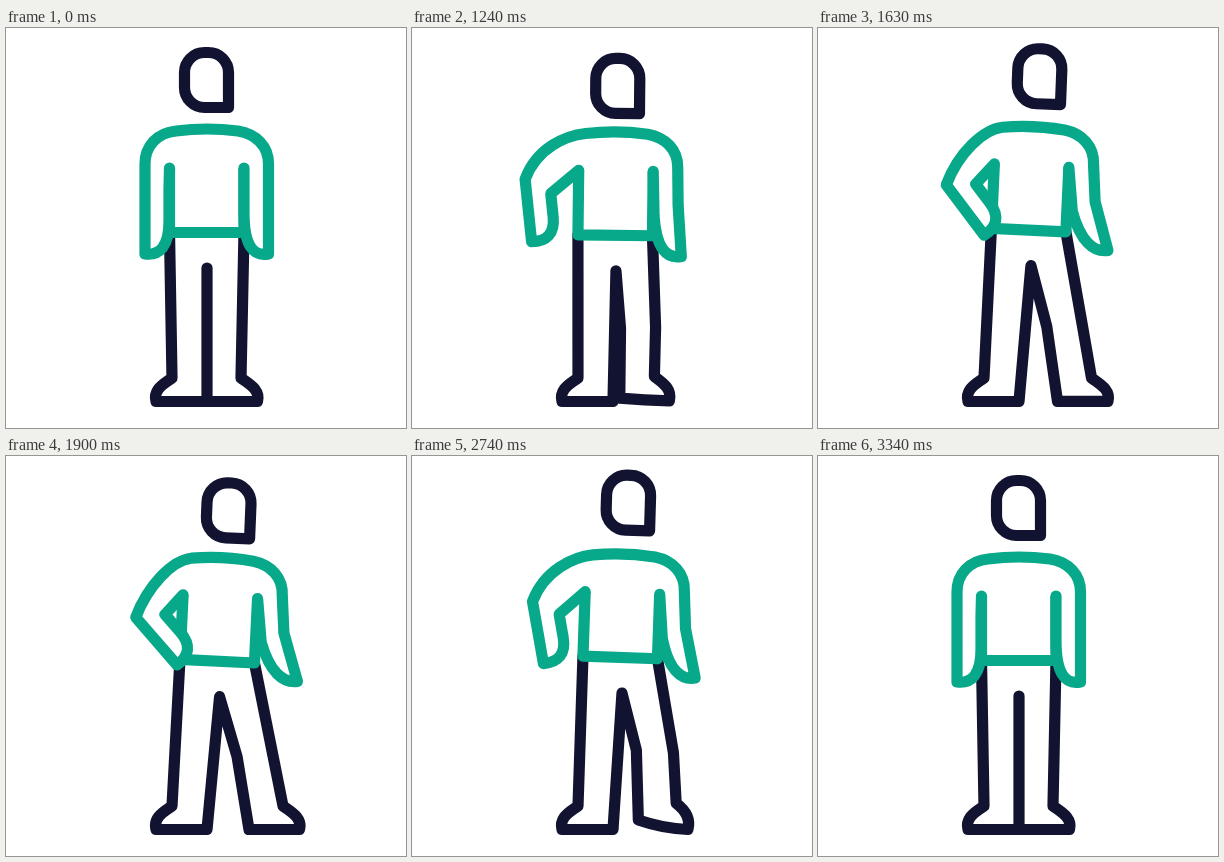
Write an HTML page that moves like this. It is 400 px wide and 400 px high and loops after 3.37 s.

```html
<!DOCTYPE html>
<html>
<head>
<meta charset="utf-8">
<style>
  html, body { margin: 0; height: 100%; overflow: hidden; background: #fff; }
  svg { display: block; width: 100vw; height: 100vh; }
  path { fill: none; stroke-width: 11.2; stroke-linecap: round; stroke-linejoin: round; }
  .dark { stroke: #121331; }
  .green { stroke: #08a88a; }
  #arms { fill: #fff; }
</style>
</head>
<body>
<svg viewBox="0 0 400 400">
  <path id="legs" class="dark"/>
  <path id="head" class="dark" d="M22 27.5H-2A20 20 0 0 1 -22 7.5V-7.5A20 20 0 0 1 -2 -27.5H2A20 20 0 0 1 22 -7.5Z"/>
  <path id="waist" class="green"/>
  <path id="arms" class="green"/>
</svg>
<script>
const LOOP = 3370;

// Motion channels as [time, value] keys
const motion = {
  lean:    [[1000, 0], [1420, 5.5], [1700, 10.5], [2500, 10.2], [2740, 7.5], [3340, 0]],
  drop:    [[1000, 0], [1210, 3], [1420, -0.8], [1530, -3], [1900, 0.7], [2320, 0.7],
            [2500, 3], [2740, -3], [3060, 1.5], [3340, 0]],
  bend:    [[1000, 0], [1310, 1.15], [1420, 1], [2740, 1], [3340, 0]],
  forearm: [[1000, 0], [1420, 15], [1600, 36], [1900, 41], [2320, 41], [2500, 28], [2740, 10], [3340, 0]],
  step:    [[1000, 0], [1420, 14.5], [1700, 42], [2320, 42], [2500, 43], [2740, 24.5], [3340, 0]],
  lift:    [[1200, 0], [1420, 7.5], [1640, 0]],
  pitch:   [[1150, 0], [1420, 0.2], [1640, 0], [2500, 0], [2740, 0.19], [2950, 0]]
};

// Monotone cubic interpolation: flat at holds and turning points
function sample(keys, t) {
  const last = keys.length - 1;
  if (t <= keys[0][0]) return keys[0][1];
  if (t >= keys[last][0]) return keys[last][1];
  const i = keys.findIndex(k => k[0] > t) - 1;
  const slope = n => (keys[n + 1][1] - keys[n][1]) / (keys[n + 1][0] - keys[n][0]);
  const tangent = n => {
    if (n === 0 || n === last) return 0;
    const a = slope(n - 1), b = slope(n);
    return a * b <= 0 ? 0 : 2 * a * b / (a + b);
  };
  const [t0, v0] = keys[i], [t1, v1] = keys[i + 1];
  const h = t1 - t0, u = (t - t0) / h, w = 1 - u;
  return v0 * (1 + 2 * u) * w * w + v1 * (3 - 2 * u) * u * u
    + h * u * w * (tangent(i) * w - tangent(i + 1) * u);
}

const add = (p, x, y) => [p[0] + x, p[1] + y];
const mix = (a, b, k) => [a[0] + (b[0] - a[0]) * k, a[1] + (b[1] - a[1]) * k];
const turn = (x, y, a) => [x * Math.cos(a) - y * Math.sin(a), x * Math.sin(a) + y * Math.cos(a)];
const move = (...pts) => 'M' + pts.join('L');
const line = (...pts) => 'L' + pts.join(' ');
const quad = (...pts) => 'Q' + pts.join(' ');
const curve = (...pts) => 'C' + pts.join(' ');
const setPath = (id, d) => document.getElementById(id).setAttribute('d', d);

function draw(t) {
  const m = {};
  for (const name in motion) m[name] = sample(motion[name], t);
  const { lean, drop, bend, forearm, step, lift, pitch } = m;
  const tilt = lean * 0.0046;

  // The trunk turns about the waist; the right arm trails further the lower it hangs
  const trunk = (x, y) => [x + lean + tilt * (204 - y), y + drop + tilt * (x - 201)];
  const hang = (x, y) => {
    const trail = lean * (y - 136) ** 2;
    return add(trunk(x, y), trail * 0.00023, -trail * 0.00005);
  };

  const head = add(trunk(200.5, 52), lean * 0.42, drop + lean * 0.1);
  document.getElementById('head').setAttribute('transform',
    `translate(${head}) rotate(${tilt * 48})`);

  const waistL = trunk(163.5, 204.5), waistR = trunk(238, 204.5);
  const pitL = trunk(163.5, 140), pitR = trunk(238, 140);
  setPath('waist', move(pitL, waistL, waistR, pitR));

  // Left forearm in its own frame: x across, y from elbow (0) to hand (1)
  const elbow = add(trunk(139, 136), bend * (0.17 * forearm - 30), bend * (10.5 + 0.42 * forearm));
  const reach = 90 - 27 * bend;
  const arm = (x, y) => add(elbow, ...turn(x, y * reach, -forearm * Math.PI / 180));
  const topL = trunk(170, 103), shoulderR = trunk(262.5, 136);
  setPath('arms', move(pitL, arm(24, 0.27), arm(24, 0.64))
    + curve(arm(24, 0.91), arm(15, 1.02), arm(0, 1))
    + line(elbow)
    + curve(add(elbow, 12 * bend, -18 - 14 * bend), add(topL, -19, 2), topL)
    + quad(trunk(201, 99), trunk(232, 103))
    + curve(trunk(250, 106), trunk(262.5, 118), shoulderR)
    + line(hang(262.5, 174), hang(262.5, 226))
    + curve(hang(247, 229), hang(238, 217), hang(238, 185))
    + line(pitR));

  // The right foot pivots on its toe and shortens while lifted
  const toe = [251.5 + step, 373.5 - lift];
  const foot = (x, y) => add(toe, ...turn(x * (1 - lift / 40), y, pitch));
  const ankle = foot(-16.5, -23.5), heel = foot(-50.5, 0);
  const crotch = [201 + lean * 1.2, 240 + drop];
  const flex = 20 * pitch + 1.2 * lift;
  setPath('legs', move(waistL, [166, 350])
    + curve([158, 356], [147, 361], [150, 373.5])
    + line([201, 373.5], crotch, add(mix(crotch, heel, 0.45), 1.2 * flex + step * 0.1, 0), heel)
    + quad(add(mix(heel, toe, 0.5), 0, 20 * pitch), toe)
    + curve(add(toe, 3, -12), add(ankle, 8, 6), ankle)
    + line(add(mix(waistR, ankle, 0.65), flex, 0), waistR));
}

const start = performance.now();
function frame() {
  draw((performance.now() - start) % LOOP);
  requestAnimationFrame(frame);
}
frame();
</script>
</body>
</html>
```
